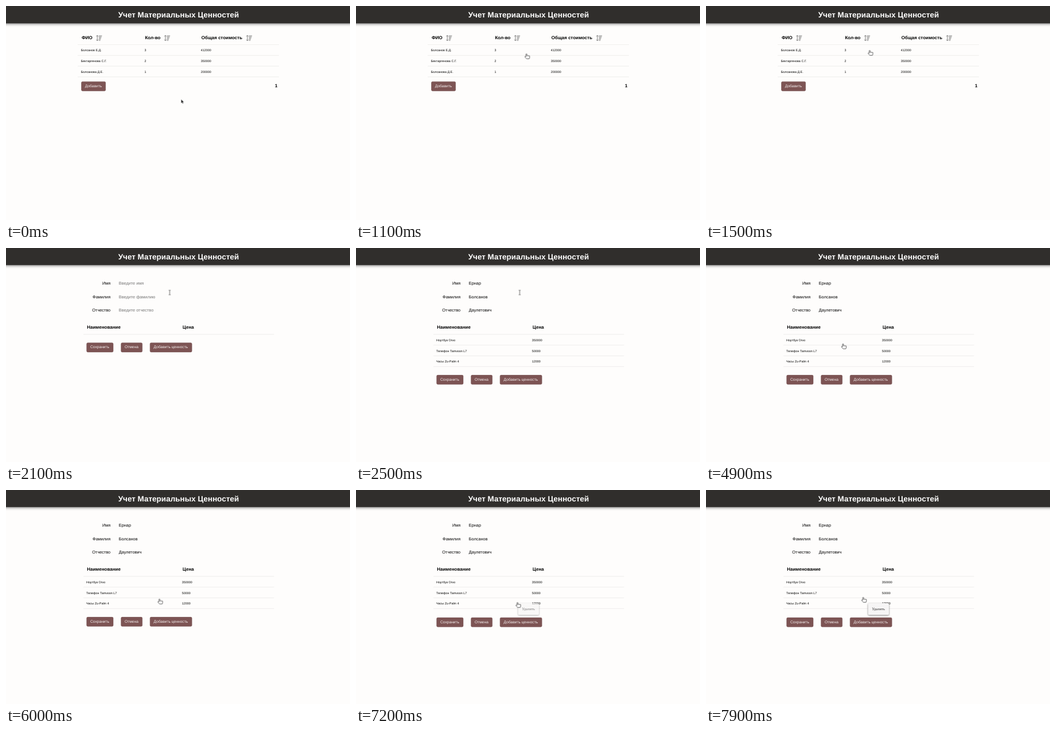
Animation, 600 px wide and 374 px high, one loop 8 s. Source, as an HTML page:

```html
<!DOCTYPE html>
<html lang="ru">
<head>
<meta charset="utf-8">
<title>Учет</title>
<style>
html, body { margin: 0; width: 100%; height: 100%; overflow: hidden; background: #fefdfc; }
svg { display: block; width: 600px; height: 374px; font-family: "Liberation Sans", Arial, sans-serif; text-rendering: geometricPrecision; }
.title { font-size: 13.5px; font-weight: bold; fill: #fff; text-anchor: middle; }
.head { font-size: 8px; font-weight: bold; }
.cell { font-size: 5.42px; }
.field { font-size: 7.33px; }
.label { text-anchor: end; }
.hint { fill: #757575; }
.rule { stroke: #ebeae9; stroke-width: .8; fill: none; }
.btn rect { fill: #7d5454; stroke: #6e4a4a; stroke-width: .5; }
.btn text { font-size: 6.67px; fill: #f6f1f0; }
.menu text { font: 6.5px "Liberation Serif", "Times New Roman", serif; fill: #222; }
.menu rect { fill: #f6f5f5; filter: drop-shadow(0 1.2px 1.8px rgba(0,0,0,.5)); }
.bar { filter: drop-shadow(0 1px 2.5px rgba(0,0,0,.55)); }

.top, .list, .form, .empty, .filled, .actions, .menu, .cursor, .arrow, .hand, .beam { animation: 8s step-end infinite; }
.top { animation-name: top; }
.list { animation-name: list; }
.form { animation-name: form; }
.empty { animation-name: empty; }
.filled { animation-name: filled; }
.actions { animation-name: actions; }
.menu { animation-name: menu; }
.cursor { animation-name: move; }
.arrow { animation-name: arrow; }
.hand { animation-name: hand; }
.beam { animation-name: beam; }

@keyframes top { 0% { transform: translateY(0); } 26.25%, 100% { transform: translateY(-.5px); } }
@keyframes list { 0% { visibility: visible; } 26.25%, 100% { visibility: hidden; } }
@keyframes form { 0% { visibility: hidden; } 26.25%, 100% { visibility: visible; } }
@keyframes empty { 0%, 31.25%, 100% { visibility: hidden; } 26.25% { visibility: visible; } }
@keyframes filled { 0% { visibility: hidden; } 31.25%, 100% { visibility: visible; } }
@keyframes actions {
  0% { transform: translateY(0); }
  31.25% { transform: translateY(56.4px); }
  90%, 100% { transform: translateY(57.3px); }
}
@keyframes menu { 0% { opacity: 0; } 90% { opacity: .6; } 92.5%, 100% { opacity: 1; } }
@keyframes arrow { 0%, 53.75% { visibility: visible; } 11.25%, 58.75%, 100% { visibility: hidden; } }
@keyframes hand { 0%, 26.25% { visibility: hidden; } 11.25%, 58.75%, 100% { visibility: visible; } }
@keyframes beam { 0%, 53.75%, 100% { visibility: hidden; } 26.25% { visibility: visible; } }
@keyframes move {
  0% { transform: translate(305.5px, 163px); }
  7.5% { transform: translate(305.6px, 161px); }
  8.75% { transform: translate(306px, 152px); }
  10% { transform: translate(306.3px, 138px); }
  11.25% { transform: translate(305.5px, 119px); }
  12.5% { transform: translate(302px, 99px); }
  13.75% { transform: translate(297.3px, 83.8px); }
  15% { transform: translate(293px, 81px); }
  16.25% { transform: translate(289px, 79px); }
  17.5% { transform: translate(286.3px, 78px); }
  18.75% { transform: translate(285.5px, 77.8px); }
  42.5% { transform: translate(285px, 78.6px); }
  43.75% { transform: translate(283px, 80px); }
  45% { transform: translate(279.5px, 83.5px); }
  46.25% { transform: translate(274.5px, 88px); }
  47.5% { transform: translate(268.5px, 94px); }
  48.75% { transform: translate(262.5px, 100.5px); }
  50% { transform: translate(256.5px, 107px); }
  51.25% { transform: translate(250.7px, 112.5px); }
  52.5% { transform: translate(248.3px, 117.3px); }
  53.75% { transform: translate(246.4px, 123px); }
  55% { transform: translate(244.6px, 130px); }
  56.25% { transform: translate(243px, 138px); }
  57.5% { transform: translate(241.5px, 147px); }
  58.75% { transform: translate(240.2px, 156px); }
  60% { transform: translate(239.4px, 163.5px); }
  61.25% { transform: translate(239px, 167.7px); }
  63.75% { transform: translate(237.5px, 172.7px); }
  68.75% { transform: translate(239.5px, 174px); }
  70% { transform: translate(244.5px, 178px); }
  71.25% { transform: translate(251.5px, 182.5px); }
  72.5% { transform: translate(258.5px, 186.5px); }
  73.75% { transform: translate(264.5px, 189.4px); }
  75% { transform: translate(267.6px, 190.7px); }
  87.5% { transform: translate(281.6px, 196.8px); }
  97.5% { transform: translate(279px, 193px); }
  98.75%, 100% { transform: translate(274.2px, 187.8px); }
}
</style>
</head>
<body>
<svg viewBox="0 0 600 374">
  <defs>
    <g id="sort" fill="none" stroke="#555" stroke-width=".75">
      <path d="M2.4 .6V9.8M.6 2.4 2.4 .5 4.2 2.4M.6 8 2.4 9.9 4.2 8"/>
      <path d="M5 1.3H10.6M5 3.3H9.9M5 5.3H9.2M5 7.3H8.5M5 9.3H7.8"/>
    </g>
  </defs>

  <g class="top">
    <rect class="bar" x="-10" y="-10" width="620" height="40.3" fill="#302e2c"/>
    <text class="title" x="301" y="20">Учет Материальных Ценностей</text>
  </g>

  <g class="list">
    <path class="rule" d="M125 67.6H476M125 86.4H476M125 105.1H476M125 123.9H476"/>
    <g class="head">
      <text x="132" y="58.3">ФИО</text>
      <text x="242.4" y="58.3">Кол-во</text>
      <text x="340.8" y="58.3">Общая стоимость</text>
      <text x="469" y="142.4">1</text>
    </g>
    <use href="#sort" x="156.8" y="50.8"/>
    <use href="#sort" x="275.6" y="50.8"/>
    <use href="#sort" x="418.6" y="50.8"/>
    <g class="cell">
      <text x="130.8" y="79.1">Болсанов Е.Д.</text><text x="241.4" y="79.1">3</text><text x="339.8" y="79.1">412000</text>
      <text x="130.8" y="97.9">Бектаргенова С.Г.</text><text x="241.4" y="97.9">2</text><text x="339.8" y="97.9">350000</text>
      <text x="130.8" y="116.6">Болсанова Д.Е.</text><text x="241.4" y="116.6">1</text><text x="339.8" y="116.6">200000</text>
    </g>
    <g class="btn">
      <rect x="131.5" y="132.2" width="42.2" height="16.2" rx="2"/>
      <text x="137.8" y="142.2">Добавить</text>
    </g>
  </g>

  <g class="form">
    <g class="field label">
      <text x="182.2" y="64">Имя</text>
      <text x="182.2" y="87.7">Фамилия</text>
      <text x="182.2" y="111.3">Отчество</text>
    </g>
    <g class="head">
      <text x="141.2" y="141.3">Наименование</text>
      <text x="308" y="141.3">Цена</text>
    </g>
    <path class="rule" d="M135 150.9H467.5"/>
  </g>

  <g class="empty field hint">
    <text x="196.8" y="64">Введите имя</text>
    <text x="196.8" y="87.7">Введите фамилию</text>
    <text x="196.8" y="111.3">Введите отчество</text>
  </g>

  <g class="filled">
    <g class="field">
      <text x="196.8" y="64">Ернар</text>
      <text x="196.8" y="87.7">Болсанов</text>
      <text x="196.8" y="111.3">Даулетович</text>
    </g>
    <path class="rule" d="M135 169.7H467.5M135 188.5H467.5M135 207.3H467.5"/>
    <g class="cell">
      <text x="140" y="162.8">Ноутбук Orvo</text><text x="306.8" y="162.8">350000</text>
      <text x="140" y="181.6">Телефон Tamvoon L7</text><text x="306.8" y="181.6">50000</text>
      <text x="140" y="200.3">Часы Zu-Palm 4</text><text x="306.8" y="200.3">12000</text>
    </g>
  </g>

  <g class="form">
    <g class="actions btn">
      <rect x="140.7" y="165.7" width="46.3" height="16.2" rx="2"/>
      <text x="147" y="175.4">Сохранить</text>
      <rect x="200.7" y="165.7" width="37" height="16.2" rx="2"/>
      <text x="207" y="175.4">Отмена</text>
      <rect x="251.2" y="165.7" width="73" height="16.2" rx="2"/>
      <text x="257.6" y="175.4">Добавить ценность</text>
    </g>
  </g>

  <g class="menu">
    <rect x="282.8" y="198" width="36.2" height="20.2" rx="1.6"/>
    <text x="289.4" y="210">Удалить</text>
  </g>

  <g class="cursor">
    <path class="arrow" d="M0 0V7.1L1.6 5.6 2.7 8.1 3.8 7.6 2.7 5.2H4.8Z" fill="#1c1c1c" stroke="#fff" stroke-width=".35"/>
    <path class="hand" d="M-.9 5V.7a.9.9 0 0 1 1.8 0V3.3a.85.85 0 0 1 1.6 .1a.85.85 0 0 1 1.6 .3a.75.75 0 0 1 1.5 .4V5.6Q5.6 7 4.8 8.4H.2L-2.6 5.4Q-3 4.5-2.2 4.1Q-1.6 4-.9 5Z" fill="#fff" stroke="#333" stroke-width=".8" stroke-linejoin="round"/>
    <path class="beam" d="M-1.7 -3.9H-.5L0 -3.5 .5 -3.9H1.7M-1.7 3.9H-.5L0 3.5 .5 3.9H1.7M0 -3.5V3.5" fill="none" stroke="#333" stroke-width=".75"/>
  </g>
</svg>
</body>
</html>
```
